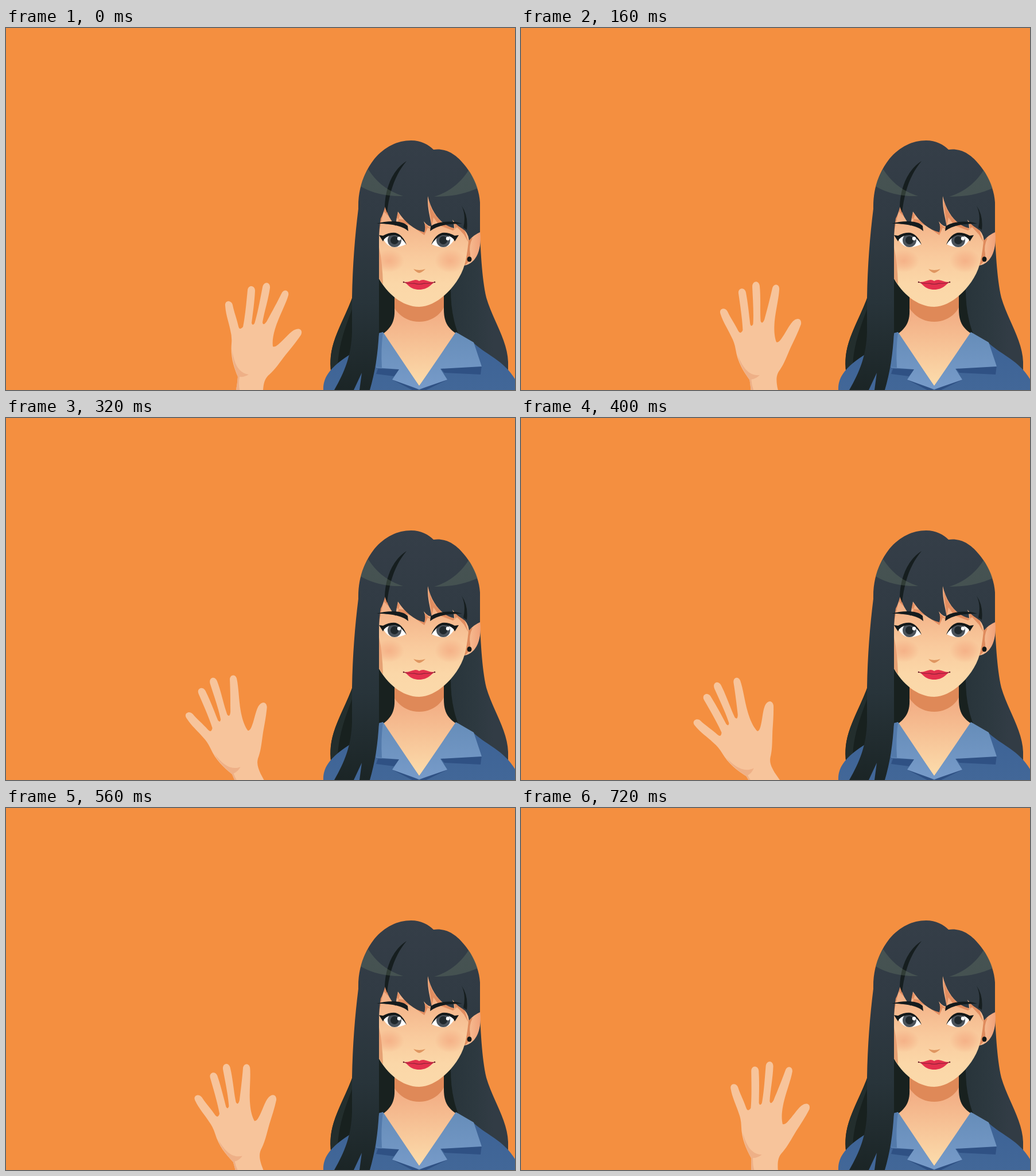
Recreate the animation shown at these times as an HTML page. Size 887x631 px, loop 0.8 s.

```html
<!DOCTYPE html>
<html lang="en">
<head>
<meta charset="utf-8">
<title>Waving hand</title>
<style>
  html, body { margin: 0; width: 100%; height: 100%; overflow: hidden; background: #f48f40; }
  svg { display: block; width: 100vw; height: 100vh; }
</style>
</head>
<body>
<svg viewBox="0 0 887 631" preserveAspectRatio="xMidYMid slice">
  <defs>
    <linearGradient id="hair" gradientUnits="userSpaceOnUse" x1="0" y1="196" x2="0" y2="631">
      <stop offset="0" stop-color="#353e48"/>
      <stop offset=".3" stop-color="#313b44"/>
      <stop offset=".65" stop-color="#28343a"/>
      <stop offset="1" stop-color="#1b2526"/>
    </linearGradient>
    <linearGradient id="backHair" gradientUnits="userSpaceOnUse" x1="770" y1="0" x2="850" y2="0">
      <stop offset="0" stop-color="#28343a"/>
      <stop offset=".6" stop-color="#2d3940"/>
      <stop offset="1" stop-color="#323c45"/>
    </linearGradient>
    <linearGradient id="face" gradientUnits="userSpaceOnUse" x1="0" y1="325" x2="0" y2="486">
      <stop offset="0" stop-color="#f2af85"/>
      <stop offset=".45" stop-color="#f9ca9d"/>
      <stop offset=".75" stop-color="#fbd7a8"/>
      <stop offset="1" stop-color="#fbd9aa"/>
    </linearGradient>
    <linearGradient id="neck" gradientUnits="userSpaceOnUse" x1="0" y1="490" x2="0" y2="615">
      <stop offset="0" stop-color="#f2ab82"/>
      <stop offset="1" stop-color="#fbd9a9"/>
    </linearGradient>
    <linearGradient id="ear" gradientUnits="userSpaceOnUse" x1="800" y1="0" x2="828" y2="0">
      <stop offset="0" stop-color="#f7c398"/>
      <stop offset="1" stop-color="#f0a078"/>
    </linearGradient>
    <linearGradient id="shirt" gradientUnits="userSpaceOnUse" x1="0" y1="552" x2="0" y2="631">
      <stop offset="0" stop-color="#3d6396"/>
      <stop offset="1" stop-color="#426798"/>
    </linearGradient>
    <linearGradient id="collar" gradientUnits="userSpaceOnUse" x1="0" y1="530" x2="0" y2="624">
      <stop offset="0" stop-color="#668db9"/>
      <stop offset="1" stop-color="#769ac8"/>
    </linearGradient>
    <radialGradient id="blush">
      <stop offset="0" stop-color="#f19c75" stop-opacity=".55"/>
      <stop offset=".5" stop-color="#f19c75" stop-opacity=".32"/>
      <stop offset="1" stop-color="#f19c75" stop-opacity="0"/>
    </radialGradient>
    <clipPath id="faceClip">
      <path d="M650 300H806V372Q803 400 799 413C789 448 752 486 720 486C690 486 664 462 650 437Z"/>
    </clipPath>
  </defs>

  <rect width="887" height="631" fill="#f48f40"/>

  <g id="hand">
    <path fill="#f7c49b" d="M382 484C381 474 393 474 395 483C397 494 402 506 405 520Q407 528 413 521
      C417 501 419 477 421 457C422 447 434 448 434 458C433 478 430 498 428 514Q429 520 433 515
      C439 496 443 472 447 452C449 441 461 442 460 453C457 474 450 495 447 513Q448 520 454 512
      C464 494 472 479 480 463C484 454 494 457 492 466C487 483 475 504 469 524C465 537 464 547 465 555
      Q468 557 474 552C483 545 493 532 501 527C511 521 518 526 514 535C506 547 496 559 487 570
      C477 583 469 595 460 603C450 611 449 620 448 631L447 690H400L401 631Q403 620 404 608
      C397 591 391 573 393 550Q394 538 391 527C388 512 383 500 382 484Z"/>
    <path fill="#eeb087" d="M394 562C398 584 404 601 423 604Q415 609 407 608Q405 620 407 631V690H400L401 631
      Q403 620 404 608C398 592 394 577 394 562Z"/>
  </g>

  <!-- back hair -->
  <path fill="#18211f" d="M606 462C594 500 570 535 566 572Q564 590 567 602L660 560L690 535L670 430H640Z"/>
  <path fill="#232e2d" d="M603 472C591 504 570 537 566 572Q565 588 568 600L578 588C580 550 592 520 603 490Z"/>
  <path fill="#18211f" d="M755 440H800V545H775L755 510Z"/>
  <path fill="url(#backHair)" d="M775 455L800 405L825 340C827 385 829 435 837 470C848 508 874 545 875 582V606L815 560L790 538C779 512 775 484 775 455Z"/>

  <!-- shirt and neck -->
  <path fill="url(#shirt)" d="M553 631C552 607 568 590 595 572L656 532H784L816 550C838 570 868 580 887 612V631Z"/>
  <path fill="#2f5184" d="M648 594L686 595L676 607L645 603ZM757 593L829 588L827 604L764 601ZM673 613L690 616L720 631H708ZM769 613L752 616L720 631H732Z"/>
  <path fill="url(#neck)" d="M677 455V490C678 510 672 522 657 533L720 624L785 533C768 522 763 510 763 490V455Z"/>
  <path fill="#df8958" d="M677 460V489C688 504 702 512 720 512C740 512 756 501 763 487V460Z"/>
  <path fill="url(#collar)" d="M657 530L720 624V630L673 613L685 595L645 592L650 532Z"/>
  <path fill="url(#collar)" d="M784 530L815 548L829 590L757 594L769 613L720 630V624Z"/>
  <path fill="#5279aa" d="M650 532L657 530Q653 560 655 592L644 591Z"/>

  <!-- ear and face -->
  <path fill="url(#ear)" d="M803 364L826 354C830 382 821 411 798 414Z"/>
  <path fill="#df8b5d" d="M804 369L813 366Q806 380 809 394Q810 408 798 414L801 394Z"/>
  <ellipse cx="807.500" cy="403" rx="4" ry="4.500" fill="#131918"/>
  <path fill="url(#face)" d="M650 300H735V285H760L806 350V372Q803 400 799 413C789 448 752 486 720 486C690 486 664 462 650 437Z"/>
  <g clip-path="url(#faceClip)">
    <path fill="#e5a173" d="M650 382Q656 408 657 447L650 437Z"/>
    <ellipse cx="667" cy="406" rx="27" ry="20" fill="url(#blush)"/>
    <ellipse cx="774" cy="406" rx="27" ry="21" fill="url(#blush)"/>
  </g>

  <!-- shade cast by the fringe -->
  <path fill="#e28e61" d="M650 335L661 308L667 328L658 320L653 342L650 358ZM680 318L686 326L683 338L705 344L729 361L735 348L741 351L742 345L735 293
    C738 313 749 330 760 338L783 351L780 334L799 352L806 374L798 360L786 347L779 353L755 344L745 330L741 350L729 340L680 332Z"/>

  <g id="eyes"></g>

  <path fill="#df955f" d="M710 420Q720 424 731 420Q725 426 720 427Q715 426 710 420Z"/>
  <path fill="#e3304d" d="M694 443C704 443 709 439 714 439Q717 439 720 441Q723 439 727 439C732 439 737 443 747 443C741 446 736 456 720 456C704 456 700 446 694 443Z"/>
  <path fill="none" stroke="#8c2036" stroke-width="1.200" d="M693 443Q701 446 711 445Q720 448 729 445Q739 446 747 443"/>
  <circle cx="693" cy="443" r="1.300" fill="#6b2029"/>
  <circle cx="747" cy="443" r="1.300" fill="#6b2029"/>

  <!-- front hair -->
  <path fill="url(#hair)" d="M614 315C613 278 625 250 642 228C660 207 682 196 706 196C723 196 736 203 745 212
    C773 208 792 228 806 248C816 262 825 284 826 304V356Q816 360 807 370Q805 355 794 349Q785 344 778 334
    Q781 341 781 349C760 344 742 324 735 293C734 312 738 326 742 346Q735 346 728 337Q732 346 729 356
    C711 352 695 338 683 320Q680 332 679 345Q665 330 661 310Q657 325 653 332Q650 350 650 370V440L650 530C648 570 643 600 634 631H616L620 601L606 631H572
    C590 600 602 570 603 530V470C604 414 608 363 614 315Z"/>
  <path fill="#161e1f" d="M698 232C674 247 661 278 660 311L664 322C668 287 677 257 698 232ZM794 310Q802 326 797 348L803 352Q806 327 794 310Z"/>
  <path fill="#70866f" fill-opacity=".3" d="M631 246Q622 260 618 276C640 289 667 294 692 293C664 284 645 268 631 246ZM806 248Q817 263 822 279C799 290 773 294 746 294C774 285 793 269 806 248Z"/>
  <path fill="#141b1d" d="M646 341C665 335 692 335 700 345L701 354C690 344 668 341 646 341ZM739 354L740 346C750 337 777 335 795 341C772 341 752 344 739 354Z"/>
</svg>
<script>
  const STEP = 80, COUNT = 10, SWING = 35.4, PIVOT = "424 634";
  const hand = document.getElementById("hand");

  // One eye; dir flips it, the catchlight stays on the right.
  function eye(x, y, dir) {
    return `<g transform="translate(${x} ${y}) scale(${dir} 1)">
      <path fill="#fff" d="M-21 -6Q-10 -13 3 -12Q14 -8 20 7Q8 13 -2 12Q-15 10 -21 -6Z"/>
      <circle r="12" fill="#4b535b"/><circle r="7" fill="#20282c"/>
      <path fill="#121819" d="M-27 -9L-20 -8Q-9 -14 2 -13Q15 -9 21 8Q12 -6 2 -9Q-11 -10 -18 -2L-20 2Z"/>
    </g><circle cx="${x + 8}" cy="${y - 3}" r="3.2" fill="#fff"/>`;
  }
  document.getElementById("eyes").innerHTML = eye(677, 370, 1) + eye(762, 370, -1);

  // Softened swing out and back, held for each step.
  function draw(ms) {
    const k = Math.floor(ms / STEP) % COUNT;
    const u = Math.min(k, COUNT - k) / (COUNT / 2);
    const angle = -SWING * (u - 0.02 * Math.sin(2 * Math.PI * u));
    hand.setAttribute("transform", `rotate(${angle.toFixed(3)} ${PIVOT})`);
  }

  let start;
  function tick(now) {
    start ??= now;
    draw(now - start);
    requestAnimationFrame(tick);
  }
  draw(0);
  requestAnimationFrame(tick);
</script>
</body>
</html>
```
